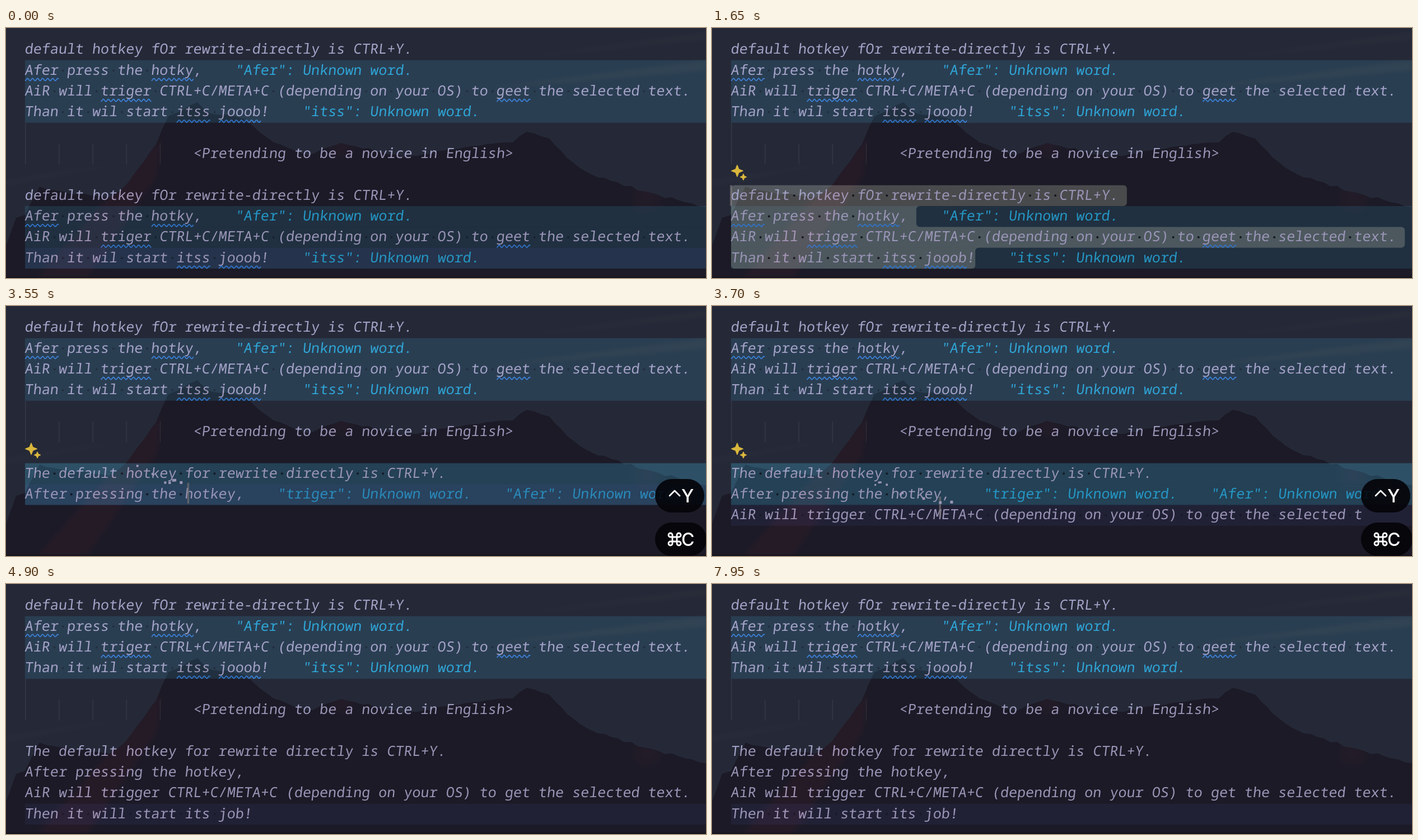
Write an HTML page with a canvas that moves like this. It is 1250 by 448 pixels and loops after 8000 ms.

```html
<!DOCTYPE html>
<html lang="en">
<head>
<meta charset="utf-8">
<title>Rewrite directly</title>
<style>
html, body { margin: 0; width: 100%; height: 100%; overflow: hidden; background: #1e1e2e; }
canvas { display: block; width: 100vw; height: 100vh; }
</style>
</head>
<body>
<canvas id="stage" width="1250" height="448"></canvas>
<script>
const W = 1250, H = 448, LOOP = 8000;
const LEFT = 34, ADVANCE = 15.04, TOP = 20.3, ROW = 37.35, FIRST = 7, LAST = 10;
const DRAG_START = 450, DRAG_END = 1250, REWRITE = 3400;
const ctx = document.getElementById('stage').getContext('2d');

const before = [
  'default hotkey fOr rewrite-directly is CTRL+Y.',
  'Afer press the hotky,',
  'AiR will triger CTRL+C/META+C (depending on your OS) to geet the selected text.',
  'Than it wil start itss jooob!'
];
const after = [
  'The default hotkey for rewrite directly is CTRL+Y.',
  'After pressing the hotkey,',
  'AiR will trigger CTRL+C/META+C (depending on your OS) to get the selected text.',
  'Then it will start its job!'
];
const typos = /Afer|hotky|triger|geet|itss|jooob/g;
const hints = { 1: ['Afer'], 3: ['itss'] };

const TEXT = '#beb8e4', HINT = '#2abaf5';
const TEAL = 'rgba(60,165,210,.2)', CURRENT = 'rgba(85,90,170,.16)';

const colX = col => LEFT + col * ADVANCE;
const rowY = row => TOP + row * ROW;
const progress = (t, from, to) => Math.max(0, Math.min(1, (t - from) / (to - from)));
const mix = (a, b, p) => a + (b - a) * p;
const random = n => { const s = Math.sin(n * 127.1 + 3.7) * 43758.5453; return s - Math.floor(s); };

// Landscape, laid translucently over the editor
function paintScenery() {
  const canvas = document.createElement('canvas');
  canvas.width = W;
  canvas.height = H;
  const c = canvas.getContext('2d');
  const shape = (points, fill) => {
    c.beginPath();
    points.forEach(([x, y]) => c.lineTo(x, y));
    c.fillStyle = fill;
    c.fill();
  };
  const roughen = points => points.flatMap(([x, y], i) => {
    const [nextX, nextY] = points[i + 1] || [x, y];
    const steps = Math.max(1, Math.round((nextX - x) / 12));
    return Array.from({ length: steps }, (_, k) => [
      mix(x, nextX, k / steps),
      mix(y, nextY, k / steps) + (k && random(x + k) * 5 - 2.5)
    ]);
  });
  const glow = (x, y, r) => {
    const g = c.createRadialGradient(x, y, 0, x, y, r);
    g.addColorStop(0, 'rgba(80,20,25,.7)');
    g.addColorStop(1, 'rgba(80,20,25,0)');
    c.fillStyle = g;
    c.fillRect(x - r, y - r, 2 * r, 2 * r);
  };
  c.fillStyle = 'rgb(68,85,94)';
  c.fillRect(0, 0, W, H);
  c.filter = 'blur(3px)';
  shape([[860, 108], [W, 58], [W, 76]], 'rgba(135,140,115,.5)');
  shape([[930, 52], [W, 8], [W, 20]], 'rgba(110,115,110,.4)');
  shape([[0, 274], [200, 243], [0, 282]], 'rgba(110,115,115,.4)');
  c.filter = 'none';

  const ridge = roughen([[0, 390], [18, 340], [34, 335], [60, 284], [130, 298], [185, 304], [214, 282],
    [268, 208], [290, 158], [342, 133], [358, 150], [430, 165], [478, 205], [540, 228], [598, 206],
    [710, 231], [845, 211], [905, 205], [930, 186], [970, 198], [1002, 233], [1045, 262],
    [1140, 293], [W, 321]]);
  shape([...ridge, [W, H], [0, H]], 'rgb(18,14,10)');
  c.save();
  c.clip();
  c.filter = 'blur(5px)';
  shape([[278, 195], [55, H], [145, H], [270, 265]], 'rgba(100,20,20,.6)');
  c.filter = 'none';
  glow(600, 212, 32);
  glow(1145, 303, 38);
  c.restore();
  return canvas;
}
const scenery = paintScenery();

function text(str, col, row, color) {
  ctx.save();
  ctx.translate(colX(col) - 1, rowY(row) + 26);
  ctx.transform(1, 0, -.11, 1, 0, 0);
  ctx.font = '25.07px "Noto Sans Mono", "Liberation Mono", monospace';
  ctx.fillStyle = color;
  ctx.fillText(str, 0, 0);
  ctx.restore();
}

function band(row, color) {
  ctx.fillStyle = color;
  ctx.fillRect(LEFT, rowY(row), W - LEFT, ROW);
}

function spaceDots(str, row, alpha, fromCol = 0) {
  ctx.fillStyle = `rgba(16,16,26,${alpha})`;
  [...str].forEach((ch, i) => {
    if (ch !== ' ' || i < fromCol) return;
    ctx.beginPath();
    ctx.arc(colX(i + .5), rowY(row) + 18.5, 2, 0, 7);
    ctx.fill();
  });
}

function squiggles(str, row) {
  ctx.strokeStyle = '#3a8cf5';
  ctx.lineWidth = 1.8;
  for (const word of str.matchAll(typos)) {
    const start = colX(word.index), length = word[0].length * ADVANCE;
    ctx.beginPath();
    for (let x = 0; x <= length; x++)
      ctx.lineTo(start + x, rowY(row) + 34.7 + 2.1 * Math.cos(x * 2 * Math.PI / 9));
    ctx.stroke();
  }
}

function hintText(words, col, row) {
  for (const word of words) {
    const message = `"${word}": Unknown word.`;
    text(message, col + 4, row, HINT);
    col += message.length + 4;
  }
}

function draftBlock(firstRow) {
  before.forEach((str, i) => {
    const row = firstRow + i;
    text(str, 0, row, TEXT);
    squiggles(str, row);
    if (hints[i]) hintText(hints[i], str.length, row);
  });
}

function roundedPolygon(points, radius) {
  const end = points[points.length - 1];
  ctx.beginPath();
  ctx.moveTo((end[0] + points[0][0]) / 2, (end[1] + points[0][1]) / 2);
  points.forEach((p, i) => ctx.arcTo(...p, ...points[(i + 1) % points.length], radius));
  ctx.closePath();
  ctx.fill();
}

// The selection is dragged from the end of the block back to its start
function dragFocus(t) {
  const p = progress(t, DRAG_START, DRAG_END), eased = p * p * (3 - 2 * p);
  const row = Math.floor(mix(LAST + .5, FIRST + .5, eased));
  const col = Math.min(Math.round(29 * (1 - eased)), before[row - FIRST].length);
  return { row, col };
}

function selection({ row, col }) {
  const points = [[colX(col), rowY(row)]];
  for (let r = row; r <= LAST; r++) {
    const length = before[r - FIRST].length;
    const right = colX(r < LAST ? length + 1 : length);
    points.push([right, rowY(r)], [right, rowY(r + 1)]);
  }
  if (row === LAST) points.push([colX(col), rowY(LAST + 1)]);
  else {
    points.push([LEFT, rowY(LAST + 1)]);
    if (col > 0) points.push([LEFT, rowY(row + 1)], [colX(col), rowY(row + 1)]);
  }
  ctx.fillStyle = 'rgba(196,200,184,.35)';
  roundedPolygon(points, 6);
}

// While rewriting, the cursor glides down, overshoots and returns to the end of the text
function cursorAt(t) {
  if (t < REWRITE) {
    const { row, col } = dragFocus(t);
    return [colX(col), rowY(row)];
  }
  const x = mix(243, 543, progress(t, REWRITE, 3950)) - 103 * progress(t, 3950, 4125);
  return [x, mix(292, 394, progress(t, REWRITE, 4020))];
}

function cursor(t) {
  if (t < DRAG_START) return;
  const settled = t < REWRITE ? 1450 : 4125;
  if (t > settled && (t - settled) % 1025 >= 500) return;
  const [x, y] = cursorAt(t);
  ctx.fillStyle = 'rgba(150,140,140,.65)';
  ctx.fillRect(x - 1.7, y, 3.5, 37);
}

function particles(t) {
  ctx.fillStyle = TEXT;
  for (let i = 0; i < 27; i++) {
    const born = REWRITE + i * 25, age = t - born;
    if (age < 0 || age > 250) continue;
    const [x, y] = cursorAt(born);
    const size = 5 - age / 120;
    ctx.fillRect(x - 15 + random(i) * 34, y - 12 + random(i + 50) * 26 + age * .03, size, size);
  }
}

function sparkle(x, y, r) {
  ctx.beginPath();
  for (let i = 0; i < 8; i++) {
    const a = i * Math.PI / 4, reach = i % 2 ? r * .4 : r;
    ctx.lineTo(x + reach * Math.cos(a), y + reach * Math.sin(a));
  }
  ctx.closePath();
  ctx.lineJoin = 'round';
  ctx.lineWidth = 1.6;
  ctx.fillStyle = ctx.strokeStyle = '#ffd035';
  ctx.fill();
  ctx.stroke();
}

const symbols = {
  control() {
    ctx.moveTo(-9, 0);
    ctx.lineTo(0, -9);
    ctx.lineTo(9, 0);
  },
  command() {
    for (let i = 0; i < 4; i++) {
      ctx.moveTo(4, -7);
      ctx.lineTo(4, 7);
      ctx.moveTo(4, 7.5);
      ctx.arc(7.5, 7.5, 3.5, Math.PI, -Math.PI / 2, true);
      ctx.rotate(Math.PI / 2);
    }
  }
};

function keyPill(symbol, letter, y, width, alpha) {
  ctx.save();
  ctx.globalAlpha = alpha;
  ctx.fillStyle = 'rgba(4,4,8,.9)';
  ctx.beginPath();
  ctx.roundRect(1159, y, width, 60, 30);
  ctx.fill();
  ctx.fillStyle = ctx.strokeStyle = '#fff';
  ctx.font = '500 32px Inter, "Open Sans", sans-serif';
  ctx.fillText(letter, 1206, y + 41.5);
  ctx.translate(1194, y + 30);
  ctx.lineWidth = 2.8;
  ctx.lineCap = 'round';
  ctx.beginPath();
  symbols[symbol]();
  ctx.stroke();
  ctx.restore();
}

function keys(t) {
  const fade = 1 - progress(t, 4300, 4800);
  keyPill('control', 'Y', t < 2450 ? 388 : 310, 88, progress(t, 2250, 2400) * fade);
  keyPill('command', 'C', 388, 92, progress(t, 2450, 2600) * fade);
}

function guides() {
  ctx.fillStyle = 'rgba(120,120,140,.22)';
  ctx.fillRect(LEFT, rowY(4), 1.5, ROW * 2);
  for (let i = 1; i <= 4; i++) ctx.fillRect(colX(i * 4), rowY(5), 1.5, ROW);
}

function draft(t) {
  const selecting = t >= DRAG_START, focus = dragFocus(t);
  for (let row = FIRST + 1; row <= LAST; row++) band(row, TEAL);
  if (selecting) selection(focus);
  else band(LAST, CURRENT);
  before.forEach((str, i) => {
    const row = FIRST + i;
    if (selecting && row >= focus.row) spaceDots(str, row, .9, row === focus.row ? focus.col : 0);
    else if (i) spaceDots(str, row, .45);
  });
  draftBlock(FIRST);
}

function rewritten(t) {
  let left = Math.floor((t - REWRITE) / 2) + 1;
  const typed = after.map(str => {
    const part = str.slice(0, Math.max(0, left));
    left -= str.length;
    return part;
  });
  const active = typed.findLastIndex(str => str);
  if (t < 3750) {
    const hinted = Math.min(1, active);
    for (let i = 0; i <= hinted; i++) {
      band(FIRST + i, TEAL);
      band(FIRST + i, TEAL);
      spaceDots(typed[i], FIRST + i, .8);
    }
    hintText(['triger', 'Afer'], typed[hinted].length, FIRST + hinted);
  }
  band(FIRST + active, CURRENT);
  spaceDots(typed[active], FIRST + active, .45);
  typed.forEach((str, i) => text(str, 0, FIRST + i, TEXT));
  if (t >= 3800 && t < 4100) {
    ctx.strokeStyle = '#85858f';
    ctx.lineWidth = 1.6;
    for (const bracket of '()')
      ctx.strokeRect(colX(after[2].indexOf(bracket)) + 1, rowY(9) + 1, 13, ROW - 2);
  }
}

function draw(t) {
  ctx.fillStyle = '#1e1e2e';
  ctx.fillRect(0, 0, W, H);
  for (let row = 1; row <= 3; row++) {
    band(row, TEAL);
    spaceDots(before[row], row, .45);
  }
  guides();
  draftBlock(0);
  text('<Pretending to be a novice in English>', 20, 5, TEXT);
  if (t < REWRITE) draft(t);
  else rewritten(t);
  cursor(t);
  particles(t);
  if (t >= 1300 && t < 4300) {
    sparkle(45, 256, 10);
    sparkle(56, 267, 5.2);
  }
  ctx.globalAlpha = .2;
  ctx.drawImage(scenery, 0, 0);
  ctx.globalAlpha = 1;
  ctx.fillStyle = 'rgba(12,12,18,.7)';
  ctx.fillRect(0, 446, W, 1.5);
  keys(t);
}

function frame() {
  draw(performance.now() % LOOP);
  requestAnimationFrame(frame);
}
frame();
</script>
</body>
</html>
```
